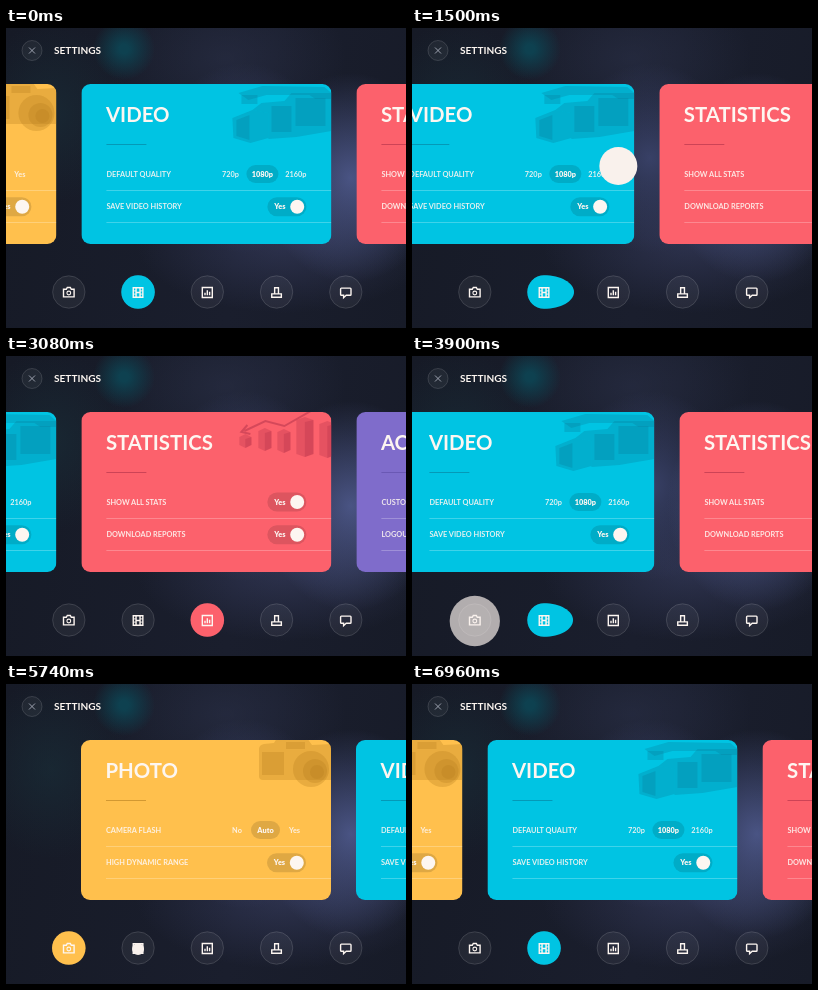
Write an HTML page that moves like this. It is 400 px wide and 300 px high and loops after 6980 ms.

```html
<!DOCTYPE html>
<html lang="en">
<head>
<meta charset="utf-8">
<title>Settings</title>
<style>
  html, body { margin: 0; width: 100%; height: 100%; overflow: hidden; background: #171b28; }
  svg { display: block; width: 400px; height: 300px;
    background:
      radial-gradient(circle 31px at 118px 21px, #0e4150 15%, #0e415000),
      radial-gradient(ellipse 90px 105px at 345px 150px, #56629acc, #56629a00),
      radial-gradient(ellipse 85px 95px at 238px 130px, #465080b0, #46508000),
      radial-gradient(ellipse 150px 70px at 280px 215px, #40466e80, #40466e00),
      radial-gradient(ellipse 120px 80px at 220px 30px, #2e344e80, #2e344e00),
      radial-gradient(ellipse 80px 90px at 45px 85px, #1a333d80, #1a333d00),
      linear-gradient(100deg, #161a26, #1a1e2d 60%, #171b28); }
  text { font: 700 7.35px Lato, "Open Sans", sans-serif; fill: #fdf6f1; }
  .title { font-size: 20.4px; }
  .head { font-size: 10.1px; }
  .label { opacity: .9; }
  .bold { font-weight: 900; }
  .mid { text-anchor: middle; }
  .art { fill: var(--dark); fill-opacity: .3; }
  .art .line { fill: none; stroke: var(--dark); stroke-opacity: .5; stroke-width: 2; }
  .ring { fill: #ffffff0d; stroke: #ffffff22; }
  .icon { fill: none; stroke: #fdf6f1; stroke-width: 1.4; }
</style>
</head>
<body>
<svg viewBox="0 0 400 300">
  <defs><clipPath id="card"><rect width="250" height="160" rx="9"/></clipPath></defs>
  <circle class="ring" cx="26" cy="22.5" r="10"/>
  <path d="M23 19.5l6 6m0-6l-6 6" stroke="#a9adba" stroke-width=".9"/>
  <text class="head" x="48" y="26.2">SETTINGS</text>
  <g id="cards"></g>
  <g id="rings"></g>
  <path id="blob"/>
  <g id="icons"></g>
  <circle id="touch" fill="#f9f1ec"/>
</svg>
<script>
const LOOP = 6980, PITCH = 275, NAV_Y = 264, NAV_R = 16.8;
const DRAG = [584, 2416], CLICK_PHOTO = 3790, CLICK_VIDEO = 6010;
const $ = id => document.getElementById(id);
const navX = i => 62.8 + 69.25 * i;

const toggle = y => `<rect x="186" y="${y - 9.5}" width="39" height="19" rx="9.5" fill="#00000020"/>
  <text class="mid bold" x="198.5" y="${y + 2.6}">Yes</text><circle cx="215.8" cy="${y}" r="7" fill="#fdf6f1"/>`;

const choice = (names, xs, w) =>
  `<rect x="${xs[1] - w / 2}" y="81" width="${w}" height="18" rx="9" fill="#00000020"/>` +
  names.map((n, i) => `<text class="mid ${i == 1 ? 'bold' : 'label'}" x="${xs[i]}" y="92.6">${n}</text>`).join('');

// Column drawn as a small box in perspective
const bar = (x, top, w, bottom) =>
  `<path d="M${x} ${top + 3}l${w * .5} -3 ${w * .5} 3v${bottom - top - 6}l${-w * .5} 3 ${-w * .5} -3z"/>
   <path d="M${x + w * .5} ${top + 5}l${w * .5} -2v${bottom - top - 6}l${-w * .5} 3z"/>`;

const cards = [
  { title: 'PHOTO', color: [255, 192, 77], dark: '#b57d20', rows: ['CAMERA FLASH', 'HIGH DYNAMIC RANGE'],
    control: choice(['No', 'Auto', 'Yes'], [156, 184.5, 213.5], 29),
    art: `<path d="M178 9q0-4 5-5l10-1 3-5h30l5 7 19-1v36h-68q-4 0-4-4z"/>
      <path d="M181 12h22v23h-22zM205 2h19v7h-19z"/>
      <circle cx="230" cy="29" r="18"/><circle cx="234" cy="31" r="12"/><circle cx="236" cy="32" r="7"/>` },
  { title: 'VIDEO', color: [0, 196, 227], dark: '#087d9c', rows: ['DEFAULT QUALITY', 'SAVE VIDEO HISTORY'],
    control: choice(['720p', '1080p', '2160p'], [149, 181, 214.5], 32),
    art: `<path d="M151 34l20-8 16 3v25l-18 5-17-5z"/>
      <path d="M155 36l13-5v25l-13-4z"/>
      <path d="M171 26l9-7 23-2 7-8h40v38l-35 6-28 2v-26z"/>
      <path d="M157 9l24-7 62 1 7 6v6h-16l-6-4h-43l-18 5z"/>
      <path d="M190 22h20v26h-20zM214 14h30v28h-30zM160 11h16v9h-16z"/>` },
  { title: 'STATISTICS', color: [252, 97, 108], dark: '#b03048', rows: ['SHOW ALL STATS', 'DOWNLOAD REPORTS'],
    control: toggle(90),
    art: `<path class="line" d="M163 19l21-10 19 5 30-17M166 13l-6 7 9 2"/>` +
      bar(158, 22, 12, 36) + bar(177, 16, 13, 39) + bar(196, 17, 13, 41) +
      bar(215, 5, 17, 45) + bar(238, 9, 16, 46) },
  { title: 'ACCOUNT', color: [127, 108, 203], dark: '#5d4ca6', rows: ['CUSTOMIZE PROFILE', 'LOGOUT'],
    control: '', art: '' }
];

$('cards').innerHTML = cards.map(c => `<g style="--dark:${c.dark}"><g clip-path="url(#card)">
  <rect width="250" height="160" fill="rgb(${c.color})"/>
  <g class="art">${c.art}</g>
  <text class="title" x="24.5" y="38">${c.title}</text>
  <path d="M25 60.5h40" stroke="${c.dark}" stroke-opacity=".6"/>
  <path d="M25 106.5h225M25 138.5h225" stroke="#fff" stroke-opacity=".28" stroke-width=".9"/>
  <text class="label" x="25" y="92.6">${c.rows[0]}</text>
  <text class="label" x="25" y="125.2">${c.rows[1]}</text>
  ${c.control}${toggle(122.7)}</g></g>`).join('');

const icons = [
  `<path d="M-5.3-3h2.8l1-1.8h3l1 1.8h2.8v7.6h-10.6z"/><circle cy=".7" r="1.9" stroke-width="1.1"/>`,
  `<path d="M-4.8-4.6h9.6v9.6h-9.6zM-2-4.6v9.6M2-4.6v9.6M-2 .2h4"/><path d="M-4.8-1.4h2.8M-4.8 1.8h2.8M2-1.4h2.8M2 1.8h2.8" stroke-width=".9"/>`,
  `<path d="M-5-4.8h10v10h-10z"/><path d="M-2.3 3v-2.6M0 3v-5M2.3 3v-3.6"/>`,
  `<path d="M-1.9 1.4v-6h3.8v6M-4.8 1.6h9.6v3.4h-9.6z"/>`,
  `<path d="M-4.4-4.2h8.8q.8 0 .8.8v5.6q0 .8-.8.8h-4l-2.6 2.4v-2.4h-2.2q-.8 0-.8-.8v-5.6q0-.8.8-.8z"/>`
];
icons.forEach((d, i) => {
  $('rings').innerHTML += `<circle class="ring" cx="${navX(i)}" cy="${NAV_Y}" r="16.2"/>`;
  $('icons').innerHTML += `<g class="icon" transform="translate(${navX(i)} ${NAV_Y + .3})">${d}</g>`;
});

const clamp = (v, a = 0, b = 1) => Math.min(b, Math.max(a, v));
const mix = (a, b, k) => a + (b - a) * k;
const ramp = (a, b, v) => clamp((v - a) / (b - a));
const smooth = (a, b, v) => { const k = ramp(a, b, v); return k * k * (3 - 2 * k); };
const easeOut = k => 1 - (1 - k) ** 3;

// Remaining share of a springy move after ms
const spring = ms => { const a = 7 * ms / 1000; return Math.exp(-a) * (Math.cos(a) + Math.sin(a)); };
const dragged = t => 205 / PITCH * smooth(...DRAG, t);

// Scroll position, counted in cards
function position(t) {
  if (t < DRAG[1]) return 1 - spring(t + LOOP - CLICK_VIDEO) + dragged(t);
  if (t < CLICK_PHOTO) {
    const a = 11 * (t - DRAG[1]) / 1000;
    return 2 - 70 / PITCH * (1 + a) * Math.exp(-a);
  }
  return t < CLICK_VIDEO ? 2 * spring(t - CLICK_PHOTO) : 1 - spring(t - CLICK_VIDEO);
}

// The front edge stretches first, then both edges travel to the next icon
const lead = f => f < 0 ? f * .75 : .19 * smooth(0, .36, f) + .81 * smooth(.42, .85, f);

function drawBlob(p) {
  const i = clamp(Math.floor(p), 0, 2), f = p - i;
  const trail = smooth(.42, .89, f);
  const L = mix(navX(i), navX(i + 1), trail) - NAV_R;
  const R = mix(navX(i), navX(i + 1), lead(f)) + NAV_R;
  const c = mix(L + NAV_R, R - NAV_R, smooth(.4, 1, f));
  const k = .5523, top = NAV_Y - NAV_R, bottom = NAV_Y + NAV_R, h = k * NAV_R;
  const half = (x, from, to, s) =>
    `C${mix(c, x, k)} ${from} ${x} ${NAV_Y - s * h} ${x} ${NAV_Y}S${mix(c, x, k)} ${to} ${c} ${to}`;
  $('blob').setAttribute('d', `M${c} ${top}${half(R, top, bottom, 1)}${half(L, bottom, top, -1)}z`);
  const rgb = cards[i].color.map((v, n) => Math.round(mix(v, cards[i + 1].color[n], trail)));
  $('blob').setAttribute('fill', `rgb(${rgb})`);
}

function drawTouch(t) {
  let x, y = NAV_Y + 1, r, alpha;
  if (t < 3000) {
    x = 309 - dragged(t) * PITCH;
    y = 138;
    r = 19 * easeOut(ramp(360, 560, t));
    alpha = 1 - ramp(DRAG[1], DRAG[1] + 90, t);
  } else {
    const first = t < 5400, release = first ? CLICK_PHOTO : CLICK_VIDEO;
    const out = ramp(release, release + 350, t);
    x = navX(first ? 0 : 1);
    r = 19 * easeOut(ramp(release - 288, release - 128, t)) + 9 * easeOut(out);
    alpha = 1 - out;
  }
  const s = { cx: x, cy: y, r, opacity: alpha };
  for (const key in s) $('touch').setAttribute(key, s[key]);
}

const groups = [...$('cards').children];
const start = performance.now();
function frame() {
  const t = (performance.now() - start) % LOOP, p = position(t);
  groups.forEach((g, i) => g.setAttribute('transform', `translate(${75 + PITCH * (i - p)} 56)`));
  drawBlob(p);
  drawTouch(t);
  requestAnimationFrame(frame);
}
frame();
</script>
</body>
</html>
```
